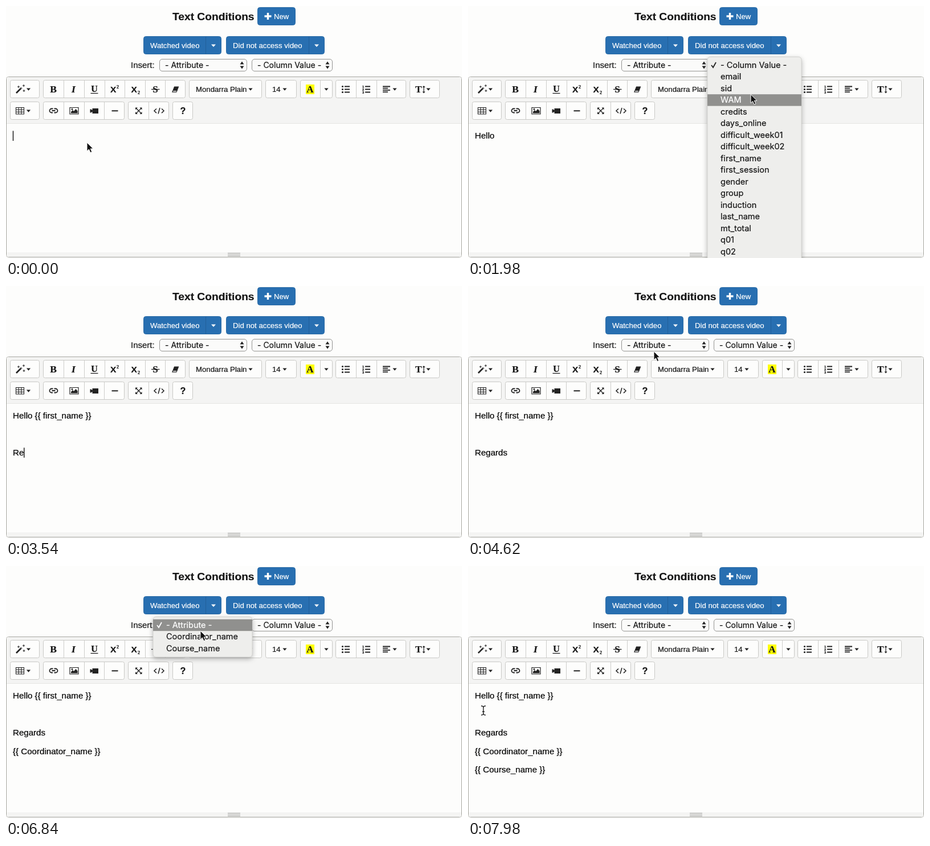
Recreate the animation shown at these times as an HTML page. Size 800x443 px, loop 8000 ms.

```html
<!DOCTYPE html>
<html lang="en">
<head>
<meta charset="utf-8">
<title>Text Conditions</title>
<style>
html, body { margin: 0; width: 100%; height: 100%; overflow: hidden; background: #fdfdfc; }
svg { display: block; width: 100vw; height: 100vh; }
text {
  --ink: #161616;
  white-space: pre; font-family: "Liberation Sans", Arial, sans-serif;
  fill: var(--ink); stroke: var(--ink); stroke-width: .22px;
}
.ui { font-family: Inter, sans-serif; }
.serif { font-family: "Liberation Serif", serif; font-weight: bold; }
.bold { font-weight: bold; }
.mid { text-anchor: middle; }
.white { --ink: #fff; }
.line { --ink: #000; }
.menu { filter: drop-shadow(0 3px 4px rgba(50, 50, 50, .35)); }
</style>
</head>
<body>
<svg id="stage" viewBox="0 0 800 443"></svg>
<script>
const LOOP = 8000, FADE = 210, BLINK = 530, ROW = 20.5, MENU_TOP = 93.7;
const INK = '#222', BLUE = '#286fb1', BAR = '#f4f4f3';
const stage = document.getElementById('stage');

const rect = (x, y, w, h, fill, stroke = 'none', r = 0) =>
  `<rect x="${x}" y="${y}" width="${w}" height="${h}" rx="${r}" fill="${fill}" stroke="${stroke}"/>`;
const path = (d, fill = INK, stroke = 'none', w = 1) =>
  `<path d="${d}" fill="${fill}" stroke="${stroke}" stroke-width="${w}"/>`;
const line = (d, w = 1.4, color = INK) => path(d, 'none', color, w);
const text = (x, y, size, str, cls = '', attrs = '') =>
  `<text x="${x}" y="${y}" font-size="${size}" class="${cls}" ${attrs}>${str}</text>`;
const caretDown = (x, y, color = INK, s = 3.6) =>
  path(`M${x - s} ${y - 2}h${2 * s}l${-s} ${s + .6}z`, color);

// Button group with divider positions
function group(x1, x2, y, ...dividers) {
  return rect(x1 + .5, y + .5, x2 - x1 - 1, 31, '#fdfdfc', '#c9c9c6', 3) +
    dividers.map(x => line(`M${x + .5} ${y + 1}v30`, 1, '#cdcdca')).join('');
}

function blueButton(x1, x2, y, split) {
  let out = rect(x1 + .5, y + .5, x2 - x1 - 1, 31, BLUE, '#2c6ca6', 4);
  if (split) out += line(`M${split + .5} ${y + 1}v30`, 1, '#21609b') + caretDown((split + x2) / 2, y + 16.5, '#fff', 4);
  return out;
}

function select(x1, x2, label) {
  const a = x2 - 9;
  return rect(x1 + .5, 93.5, x2 - x1 - 1, 21, '#fbfbfa', '#949492', 4.5) +
    text(x1 + 10, 108.8, 14, label, 'ui') +
    path(`M${a - 3.5} 102.5h7l-3.5 -5zM${a - 3.5} 105.5h7l-3.5 5z`);
}

function header() {
  return text(292, 24.5, 19.2, 'Text Conditions', 'bold') +
    blueButton(441, 508, 2) + line('M453.5 18h12M459.5 12v12', 3.4, '#fff') +
    text(470, 23, 13.1, 'New', 'white') +
    blueButton(241, 378, 53, 350) + text(253, 73.5, 13.15, 'Watched video', 'white') +
    blueButton(386, 559, 53, 531) + text(398, 73.5, 13.2, 'Did not access video', 'white') +
    text(219, 109, 15, 'Insert:') +
    select(269, 423, '- Attribute -') + select(431, 573, '- Column Value -');
}

function panel() {
  return rect(.5, 124.5, 799, 317, '#fdfdfc', '#a6a6a0', 4) +
    path('M1 206V128a3 3 0 0 1 3 -3H796a3 3 0 0 1 3 3V206z', BAR) +
    line('M1 206.5H799', 1, '#e6e6e3') +
    path('M1 433H799V438a3 3 0 0 1 -3 3H4a3 3 0 0 1 -3 -3z', BAR) +
    line('M389 434.5h22M389 437h22M389 439.5h22', 1, '#a5a5a3');
}

function firstRow() {
  const g = (...a) => group(a[0], a[1], 130, ...a.slice(2));
  const bars = (x, lens) => lens.map((w, i) => `M${x} ${141.5 + i * 3.2}h${w}`).join('');
  return g(7, 59) + g(65, 315, 101, 137, 173, 208, 244, 279) + g(321, 449) + g(455, 510) +
    g(516, 573, 551) + g(578, 702, 614, 650) + g(708, 761) +
    line('M18 153L27.5 143.5', 2.6) + line('M26 145l2 -2', 1, '#fff') +
    line('M22 140v4M20 142h4M31 138v4M29 140h4M31.5 147v4M29.5 149h4', 1) + caretDown(39.5, 146.5) +
    text(83, 152, 17.5, 'B', 'serif mid') +
    text(118.5, 152, 17.5, 'I', 'serif mid', 'font-style="italic"') +
    text(155, 151, 16, 'U', 'serif mid') + line('M148.5 153.5h13', 1.3) +
    text(183, 152, 15.5, 'X', 'bold') + text(194, 145, 8, '2', 'serif') +
    text(219.5, 152, 15.5, 'X', 'bold') + text(231, 155, 8, '2', 'serif') +
    text(262, 152, 17, 'S', 'serif mid') + line('M255 146.5h14.5', 1.3) +
    path('M295.5 142h7l-2.2 6h-7z', INK, INK, 1.2) +
    path('M293 148.500h7l-1.100 2.700h-7z', '#fff', INK, 1.2) +
    text(333, 150.5, 13.2, 'Mondarra Plain') + caretDown(429, 146.5) +
    text(467, 150.5, 13.2, '14') + caretDown(489, 146.5) +
    rect(526, 138, 15, 17, '#ffff00') + text(533.5, 152, 17, 'A', 'serif mid') + caretDown(562, 146.5) +
    line('M594 141.5h9M594 146.5h9M594 151.5h9', 2) +
    [141.5, 146.5, 151.5].map((y, i) => `<circle cx="590.5" cy="${y}" r="1.6" fill="${INK}"/>` +
      text(625, y + 2.2, 5.8, i + 1, 'bold')).join('') +
    line('M630 141.5h9M630 146.5h9M630 151.5h9', 2) +
    line(bars(661, [13, 9, 13, 9]), 1.8) + caretDown(682, 146.5) +
    text(718, 152, 17, 'T', 'serif') + line('M733 141v11', 1.2) +
    path('M730.5 143l2.5 -3 2.5 3zM730.5 150.5l2.5 3 2.5 -3z') + caretDown(741, 146.5);
}

function secondRow() {
  const g = (...a) => group(a[0], a[1], 168, ...a.slice(2));
  return g(7, 59) + g(65, 208, 101, 137, 172) + g(214, 286, 250) + g(292, 328) +
    line('M17.5 178.5h14v11.5h-14zM17.5 182.3h14M17.5 186.2h14M22.2 178.5v11.5M26.9 178.5v11.5', 1.1) +
    caretDown(39.5, 184.5) +
    line('M82 187.5h-2a3.5 3.5 0 0 1 0 -7h2.5M84.5 180.5h2.5a3.5 3.5 0 0 1 0 7h-2.5M80.5 184h6', 1.8) +
    line('M112 178.5h15v11.5h-15z', 1.2) + path('M114 188.5v-2.5l3 -3 2 2 3.5 -4 3 3.5v4z') +
    `<circle cx="116" cy="181.5" r="1.4" fill="${INK}"/>` +
    path('M147.5 181.5h1.5l2.5 1.7v-3.2h10.5v9h-10.5v-3.2l-2.5 1.7h-1.5z') +
    line('M185.5 184.3h11', 2) +
    line('M228 179.5l9.5 9.5M237.5 179.5l-9.5 9.5', 1.3) +
    path('M227 178.5h4l-4 4zM238.5 178.5v4l-4 -4zM227 190v-4l4 4zM238.5 190h-4l4 -4z') +
    line('M264 180.5l-4 3.8 4 3.8M273 180.5l4 3.8 -4 3.8M270 179l-3 10.5', 1.5) +
    text(310.5, 190, 16, '?', 'bold mid');
}

// Pop-up menus: shown from open to close, then faded
const menus = [
  { x: 420, w: 165, box: [431, 573], open: 1620, close: 2340,
    items: ['- Column Value -', 'email', 'sid', 'WAM', 'credits', 'days_online', 'difficult_week01',
      'difficult_week02', 'first_name', 'first_session', 'gender', 'group', 'induction', 'last_name',
      'mt_total', 'q01', 'q02', 'q03'] },
  ...[[4980, 5580], [6720, 7320]].map(([open, close]) => ({
    x: 258, w: 174, box: [269, 423], open, close,
    items: ['- Attribute -', 'Coordinator_name', 'Course_name'] }))
];

function drawMenu(m, t, y) {
  const age = t - m.close;
  if (t < m.open || age >= FADE) return '';
  const hot = Math.max(0, Math.min(m.items.length - 1, Math.floor((y - MENU_TOP) / ROW)));
  const rows = m.items.map((s, i) =>
    (i === hot ? rect(m.x, MENU_TOP + i * ROW, m.w, ROW, '#90908e') : '') +
    text(m.x + 23, MENU_TOP + 15 + i * ROW, 14.5, s, i === hot ? 'ui white' : 'ui')).join('');
  const [a, b] = m.box;
  return `<rect x="${a}" y="93" width="${b - a}" height="22" rx="5" fill="none" stroke="#888" stroke-opacity=".5" stroke-width="3"/>` +
    `<g class="menu" opacity="${age > 0 ? 1 - age / FADE : 1}">` +
    rect(m.x, 89.5, m.w, m.items.length * ROW + 9, '#eeeeec', '#d2d2cf', 5) + rows +
    line(`M${m.x + 7} 104l3 4 5 -9`, 1.8, hot ? INK : '#fff') + '</g>';
}

// Edits: [time, added text, keeps the text caret]
const edits = [];
const type = (str, from, step) => [...str].forEach((c, i) => edits.push([from + i * step, c, true]));
const insert = (name, at) => edits.push([at, `{{ ${name} }}`, false]);
type('Hello ', 300, 126);
insert('first_name', 2630);
type('\n\n', 3000, 180);
type('Regards\n', 3380, 100);
insert('Coordinator_name', 5930);
type('\n', 6300, 0);
insert('Course_name', 7550);

// Pointer path: [time, x, y]
const moves = [[0, 142, 240], [1080, 142, 240], [1400, 496, 94], [1800, 496, 94], [2250, 496, 267],
  [4260, 496, 267], [4600, 326, 115], [4850, 326, 108], [5100, 326, 108], [5400, 331, 117],
  [6150, 331, 117], [6600, 341, 114], [6950, 341, 114], [7200, 341, 140], [7580, 341, 140],
  [7940, 27, 254], [LOOP, 27, 254]];
const hiddenWhileTyping = [[300, 1080], [3000, 4260]];

function pointerAt(t) {
  const i = moves.findIndex(m => m[0] > t);
  const [t0, x0, y0] = moves[i - 1], [t1, x1, y1] = moves[i];
  const k = (t - t0) / (t1 - t0), e = k * k * (3 - 2 * k);
  return [x0 + (x1 - x0) * e, y0 + (y1 - y0) * e];
}

function drawPointer(t, x, y) {
  if (hiddenWhileTyping.some(([a, b]) => t >= a && t < b)) return '';
  const shape = t > 7580 && y > 206
    ? line('M-4 -8q4 0 4 3V5q0 3 -4 3M4 -8q-4 0 -4 3M4 8q-4 0 -4 -3M-2 2h4', 1.4, '#222')
    : path('M0 0V15.2L3.5 11.9L6 17.7L8.8 16.5L6.3 10.9H11z', '#111', '#fff', 1);
  return `<g transform="translate(${x} ${y})">${shape}</g>`;
}

stage.innerHTML = header() + panel() + firstRow() + secondRow() +
  [0, 1, 2, 3, 4].map(i => text(12, 233.3 + i * 32.4, 15.1, '', 'line')).join('') +
  '<path id="caret" stroke="#000" stroke-width="1.3"/><g id="overlay"></g>';
const lines = [...stage.querySelectorAll('.line')];
const caret = document.getElementById('caret');
const overlay = document.getElementById('overlay');

function render(t) {
  const done = edits.filter(e => e[0] <= t);
  const rows = done.map(e => e[1]).join('').split('\n');
  lines.forEach((el, i) => el.textContent = rows[i] || '');

  const [last, , typed] = done.length ? done[done.length - 1] : [0, '', true];
  const inMenu = menus.some(m => m.open > last && m.open <= t);
  const on = typed && !inMenu && Math.floor((t - last) / BLINK) % 2 === 0;
  const n = rows.length - 1;
  const x = 12.5 + (rows[n] ? lines[n].getComputedTextLength() : 0);
  caret.setAttribute('d', on ? `M${x} ${219.5 + n * 32.4}v17.5` : '');

  const [px, py] = pointerAt(t);
  overlay.innerHTML = menus.map(m => drawMenu(m, t, py)).join('') + drawPointer(t, px, py);
}

const start = performance.now();
function tick() {
  render((performance.now() - start) % LOOP);
  requestAnimationFrame(tick);
}
tick();
</script>
</body>
</html>
```
